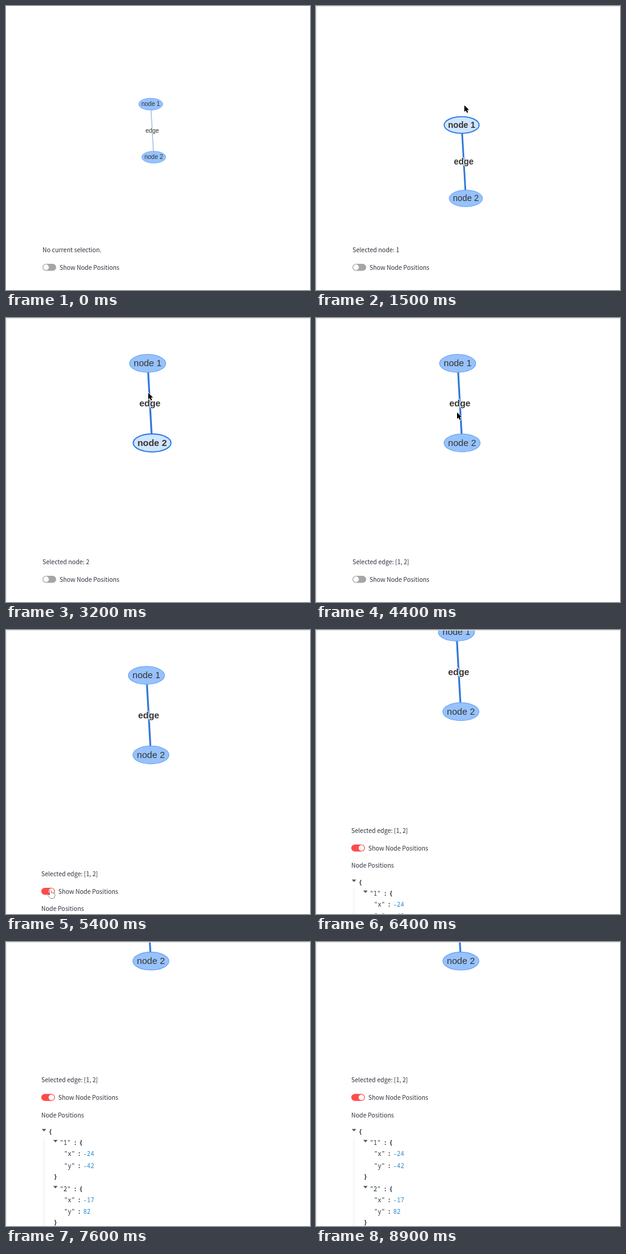
An HTML page with a canvas that plays this animation: 500 px wide and 466 px high, repeating every 9.1 s.

```html
<!DOCTYPE html>
<html lang="en">
<head>
<meta charset="utf-8">
<title>Graph selection</title>
<style>
  html, body { margin: 0; width: 100%; height: 100%; overflow: hidden; background: #fff; }
  canvas { display: block; }
</style>
</head>
<body>
<canvas id="stage" width="500" height="466"></canvas>
<script>
const ctx = document.getElementById('stage').getContext('2d');
const LOOP = 9100, STEP = 100;
const SANS = '"Noto Sans CJK JP", "Noto Sans CJK SC", "Noto Sans", sans-serif';
const MONO = '"Noto Sans Mono", "DejaVu Sans Mono", monospace';
const ARIAL = '"Liberation Sans", Arial, sans-serif';
const INK = '#31333f', BLUE = '#2b7ce9';

// View keys: time, node 1 x/y, node 2 x/y, scale
const VIEW = [
  [1100, 238, 161, 243, 248, 1],
  [1700, 240, 205, 247.5, 335, 1.5],
  [2650, 240, 205, 247.5, 335, 1.5],
  [3150, 233, 74.5, 240.3, 205, 1.5]
];
const POINTER = [
  [600, 291, 318], [700, 267, 240], [900, 267, 240], [1100, 244, 163],
  [1900, 244, 163], [2400, 246, 316], [2700, 246, 316], [3200, 234, 123],
  [3500, 232, 155], [4800, 232, 155], [5100, 73, 427], [5500, 73, 427], [5900, 325, 400]
];
const SCROLL = [[6100, 0], [6400, 71], [6800, 108], [7000, 173.7]];

const linear = p => p;
const easeInOut = p => p < .5 ? 2 * p * p : 1 - 2 * (1 - p) ** 2;

function sample(keys, t, ease = linear) {
  const next = keys.findIndex(k => k[0] > t);
  if (next === 0) return keys[0].slice(1);
  if (next < 0) return keys[keys.length - 1].slice(1);
  const a = keys[next - 1], b = keys[next];
  const p = ease((t - a[0]) / (b[0] - a[0]));
  return a.slice(1).map((v, i) => v + (b[i + 1] - v) * p);
}

function text(str, x, y, font, color = INK, align = 'left') {
  ctx.font = font;
  ctx.fillStyle = color;
  ctx.textAlign = align;
  ctx.fillText(str, x, y);
}

const label = (str, x, y) => text(str, x, y + 3.8, '10px ' + SANS);

function drawNode(name, x, y, s, selected) {
  ctx.beginPath();
  ctx.ellipse(x, y, (selected ? 20.7 : 19.8) * s, 9.8 * s, 0, 0, Math.PI * 2);
  ctx.fillStyle = selected ? '#d2e5ff' : '#97c2fc';
  ctx.fill();
  ctx.strokeStyle = selected ? BLUE : '#5f9cf0';
  ctx.lineWidth = selected ? 1.3 * s : .7 * s;
  ctx.stroke();
  text(name, x, y + 3.2 * s, `${selected ? 'bold ' : ''}${10 * s}px ${ARIAL}`, '#343434', 'center');
}

function drawGraph(t, selection) {
  const [x1, y1, x2, y2, s] = sample(VIEW, t, easeInOut);
  const active = selection !== '';
  ctx.beginPath();
  ctx.moveTo(x1, y1);
  ctx.lineTo(x2, y2);
  ctx.strokeStyle = active ? '#2f78d8' : '#a9c1ec';
  ctx.lineWidth = (active ? 2 : 1.6) * s;
  ctx.stroke();

  const mx = (x1 + x2) / 2, my = (y1 + y2) / 2 + 3.2 * s;
  ctx.font = `${active ? 'bold ' : ''}${10 * s}px ${ARIAL}`;
  ctx.textAlign = 'center';
  ctx.lineJoin = 'round';
  ctx.strokeStyle = '#fff';
  ctx.lineWidth = 1.4 * s;
  ctx.strokeText('edge', mx, my);
  text('edge', mx, my, ctx.font, '#343434', 'center');

  drawNode('node 1', x1, y1, s, selection === 'node: 1');
  drawNode('node 2', x2, y2, s, selection === 'node: 2');
}

function drawToggle(on) {
  ctx.beginPath();
  ctx.roundRect(60, 423, 22.5, 11.5, 5.75);
  ctx.fillStyle = on ? '#ff4b4b' : '#a5a5a8';
  ctx.fill();
  ctx.beginPath();
  ctx.arc(on ? 76.7 : 65.9, 428.7, 4.6, 0, Math.PI * 2);
  ctx.fillStyle = '#fff';
  ctx.fill();
  label('Show Node Positions', 88, 428.7);
}

function drawJson() {
  const mono = (str, x, y, color = '#20303a', weight = '') =>
    text(str, x, y + 3.5, `${weight} 10px ${MONO}`, color);
  const arrow = (x, y) => {
    ctx.beginPath();
    ctx.moveTo(x - 3.6, y - 2);
    ctx.lineTo(x + 3.6, y - 2);
    ctx.lineTo(x, y + 2);
    ctx.fillStyle = '#4c5458';
    ctx.fill();
  };
  const field = (key, value, y) => {
    mono(`"${key}"`, 97.5, y);
    mono(':', 119.5, y, INK, 'bold');
    mono(value, 129, y, '#268bd2');
  };
  ctx.fillStyle = '#ebebeb';
  ctx.fillRect(64, 495, 1, 160);
  arrow(64.5, 482.5);
  mono('{', 72, 485.3, INK, 'bold');
  [['1', -24, -42], ['2', -17, 82]].forEach(([id, x, y], i) => {
    const top = 503.3 + i * 75.5;
    arrow(83.3, top - 2.8);
    mono(`"${id}"`, 90.5, top);
    mono(':', 113, top, INK, 'bold');
    mono('{', 122.3, top, INK, 'bold');
    field('x', x, top + 18);
    field('y', y, top + 37.5);
    mono('}', 80.5, top + 55.7, INK, 'bold');
  });
}

const ARROW = new Path2D('M0 0V10.5L2.5 8.4L4.3 12.3L6.2 11.5L4.5 7.6H7.8Z');
const HAND = new Path2D('M-1.2 5V.6Q0-.9 1.2.6V5L2 3.8Q3.4 3.4 3.6 5Q5 4.2 5.4 5.8Q7 5.4 7 7V9.5L5.6 13H-.4L-4 8.2Q-3.6 6.4-1.2 8.2Z');

function drawPointer(t) {
  if (t < 600 || t >= 5900) return;
  const [x, y] = sample(POINTER, t);
  const hand = t >= 5100 && t <= 5500;
  const shape = hand ? HAND : ARROW;
  ctx.save();
  ctx.translate(x, y);
  ctx.lineJoin = 'round';
  ctx.lineWidth = hand ? 1 : 1.6;
  ctx.strokeStyle = hand ? '#222' : '#fff';
  ctx.fillStyle = hand ? '#fff' : '#000';
  ctx.stroke(shape);
  ctx.fill(shape);
  ctx.restore();
}

function draw(t) {
  const selection = t < 1200 ? '' : t < 2700 ? 'node: 1' : t < 3900 ? 'node: 2' : 'edge: [1, 2]';
  const expanded = t >= 5400;
  ctx.fillStyle = '#fff';
  ctx.fillRect(0, 0, 500, 466);

  ctx.save();
  ctx.translate(expanded ? -2 : 0, -sample(SCROLL, t)[0]);
  drawGraph(t, selection);
  label(selection ? 'Selected ' + selection : 'No current selection.', 60, 400.2);
  drawToggle(t >= 5300);
  if (expanded) {
    label('Node Positions', 60, 457.5);
    drawJson();
  }
  ctx.restore();

  if (t >= 900) {
    ctx.fillStyle = '#e2e2e4';
    ctx.fillRect(0, 0, 500, 1);
    ctx.fillRect(0, 0, 1, 466);
  }
  drawPointer(t);
}

function tick() {
  const t = performance.now() % LOOP;
  draw(Math.floor(t / STEP) * STEP);
  requestAnimationFrame(tick);
}
tick();
</script>
</body>
</html>
```
